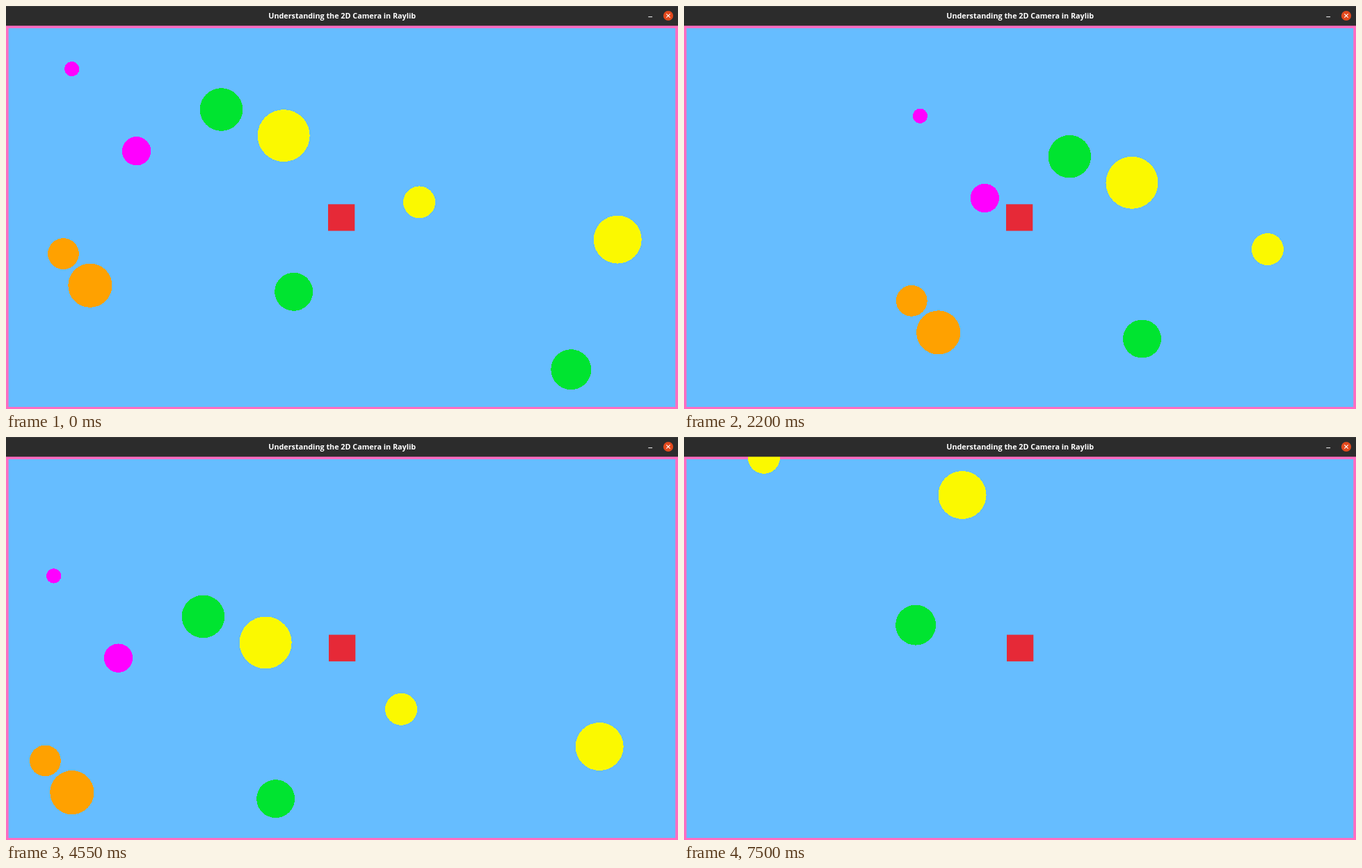
Recreate the animation shown at these times as an HTML page. Size 966 px wide and 580 px high, loop 7550 ms.

```html
<!DOCTYPE html>
<html lang="en">
<head>
<meta charset="utf-8">
<title>2D Camera</title>
<style>
  html, body { margin: 0; width: 100%; height: 100%; overflow: hidden; background: #66bdff; }
  svg { display: block; width: 100%; height: 100%; }
  text { font: 700 10.8px "Open Sans", "Noto Sans", sans-serif; fill: #fff; text-anchor: middle; }
</style>
</head>
<body>
<svg viewBox="0 0 966 580">
  <rect width="966" height="580" fill="#ff6dc2"/>
  <rect x="3.6" y="32" width="958.6" height="545" fill="#66bdff"/>
  <g id="world" shape-rendering="crispEdges"></g>
  <rect id="player" width="38.3" height="38.3" fill="#e62937"/>
  <rect width="966" height="28.4" fill="#2c2c2c"/>
  <rect width="966" height="1" fill="#3a3a3a"/>
  <text x="483.2" y="18.2">Understanding the 2D Camera in Raylib</text>
  <path d="M923.3 15.6h5.8" stroke="#e8e8e8" stroke-width="1.1"/>
  <circle cx="952" cy="14" r="7.1" fill="#e2491d"/>
  <path d="M949.3 11.3l5.4 5.4m0-5.4l-5.4 5.4" stroke="#fff" stroke-width="1.2"/>
</svg>
<script>
const LOOP = 7550, STEP = 50;
const TICK_RATE = 0.0592;   // game ticks per ms
const TICK_SIZE = 125 / 48; // pixels the camera moves per tick

// When each arrow key is held, in ms
const keys = {
  right: [37, 1625],
  down: [1766, 2864],
  left: [2796, 7500],
  up: [4164, 6900]
};

// Ball centres and radii, grouped by colour
const balls = {
  "#ff00ff": [[94.7, 90.6, 10.6], [187.6, 208.8, 20.7]],
  "#00e430": [[309.5, 149, 30.8], [413.7, 411.3, 27.5], [812.3, 523.2, 29]],
  "#fbf900": [[399.2, 186.6, 37.5], [594.1, 282.4, 23], [879.2, 336.1, 34.5]],
  "#ffa100": [[82.5, 356.6, 22.4], [120.9, 402.2, 31.6]]
};

const world = document.getElementById("world");
const player = document.getElementById("player");

function setAll(node, attributes) {
  for (const [key, value] of Object.entries(attributes)) node.setAttribute(key, value);
}

for (const [fill, group] of Object.entries(balls)) {
  for (const [cx, cy, r] of group) {
    const ball = document.createElementNS("http://www.w3.org/2000/svg", "circle");
    setAll(ball, { cx, cy, r, fill });
    world.append(ball);
  }
}

function held([from, to], t) {
  return Math.max(0, Math.min(t, to) - from);
}

function travel(forward, back, t) {
  return Math.round((held(forward, t) - held(back, t)) * TICK_RATE) * TICK_SIZE;
}

function draw(time) {
  const t = Math.floor((time % LOOP) / STEP) * STEP;
  const x = travel(keys.right, keys.left, t);
  const y = travel(keys.down, keys.up, t);
  world.setAttribute("transform", `translate(${x} ${y})`);

  // Turning back rounds the player to the neighbouring pixel
  const turned = held(keys.left, t) > 0;
  setAll(player, turned ? { x: 464, y: 284.6 } : { x: 463, y: 285.3 });
}

let start;
function frame(now) {
  start ??= now;
  draw(Math.max(0, now - start));
  requestAnimationFrame(frame);
}
draw(0);
requestAnimationFrame(frame);
</script>
</body>
</html>
```
